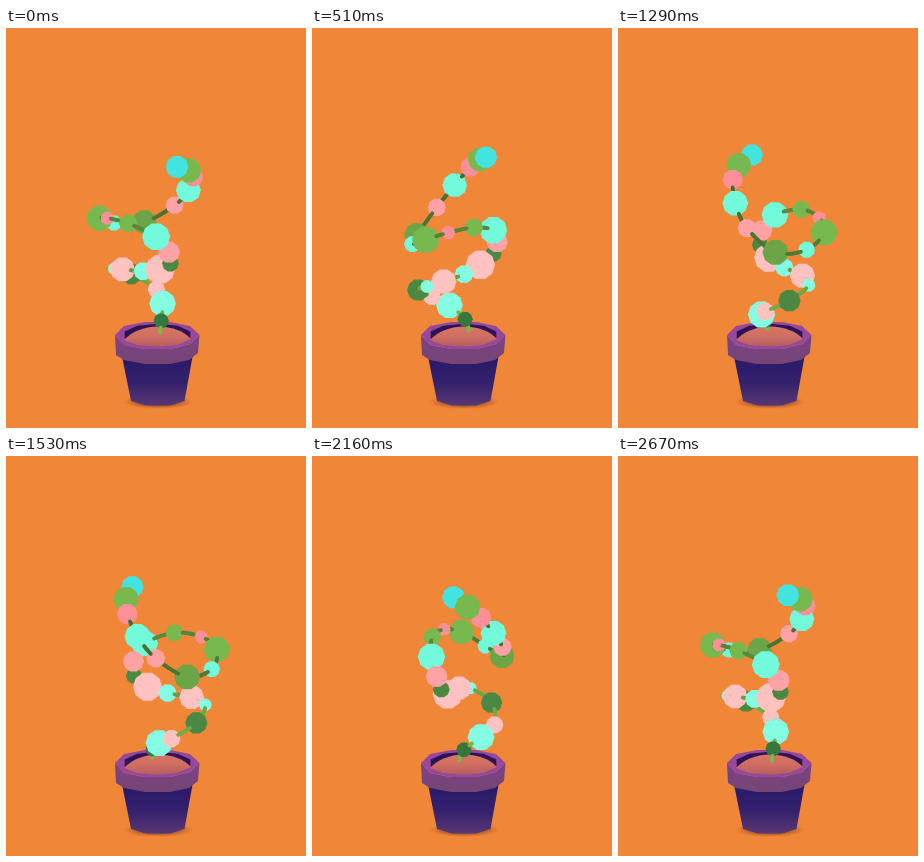
Recreate the animation shown at these times as an HTML page with a canvas. Size 300x400 px, loop 2700 ms.

```html
<!DOCTYPE html>
<html lang="en">
<head>
<meta charset="utf-8">
<title>Potted plant</title>
<style>
html, body { margin: 0; width: 100%; height: 100%; overflow: hidden; background: #f08637; }
canvas { display: block; }
</style>
</head>
<body>
<canvas id="stage" width="300" height="400"></canvas>
<script>
const ctx = document.getElementById("stage").getContext("2d");
const LOOP = 2700, STEP = 30;
const CENTER = 151.2, TILT = 0.333, RISE = 0.943;

const COLORS = {
  deep: "#34783d", dark: "#4b8841", green: "#78b94f", mid: "#6ba547",
  cyan: "#72fadb", ice: "#85fde3", aqua: "#43e4df",
  pink: "#fd9096", rose: "#ffa2a6", blush: "#ffc2c0"
};

// Each blob: sideways offset, depth offset, height on stage, radius, color.
const blobs = [
  [4, -0.5, 292.5, 7.5, "deep"],
  [5.4, 17, 281.2, 13.2, "ice"],
  [-0.8, 33.3, 272.5, 8.7, "blush"],
  [-25.8, 38.2, 258.8, 10.7, "dark"],
  [-43, 21.7, 248, 6.3, "ice"],
  [-34.6, 7, 243.7, 12.2, "blush"],
  [-14.3, -6.6, 241, 9, "ice"],
  [2.9, -17.3, 235.6, 14.5, "blush"],
  [13.2, -27.3, 226.4, 8, "dark"],
  [11.8, -31.8, 213.5, 10.5, "rose"],
  [-1.1, -33, 197.7, 13.4, "cyan"],
  [-29.1, -23.1, 187.7, 8.8, "green"],
  [-49.9, -3.9, 188.8, 6.6, "pink"],
  [-57.7, 17.1, 196, 13, "green"],
  [-43.1, 37.4, 207.5, 8, "cyan"],
  [-12.7, 45, 208.9, 12.4, "mid"],
  [17.4, 35.6, 189.2, 9, "rose"],
  [31.2, 21.7, 169.5, 12.4, "cyan"],
  [35.8, 6.9, 151, 10, "pink"],
  [31.5, -5.6, 140.5, 12.4, "green"],
  [19.8, -16.6, 133.3, 11, "aqua"]
].map(([x, z, y, r, color]) => ({ x, z, y, r, color: COLORS[color] }));

const root = { x: 3, z: -5, y: 303 };
const stem = buildStem([root, ...blobs], 14);

function spline(a, b, c, d, t) {
  return b + 0.5 * t * (c - a + t * (2 * a - 5 * b + 4 * c - d + t * (3 * (b - c) + d - a)));
}

function insideBlob(p) {
  return blobs.some(b => Math.hypot(p.x - b.x, p.z - b.z, (p.y - b.y) / RISE) < b.r * 0.96);
}

function buildStem(nodes, parts) {
  const points = [];
  const at = i => nodes[Math.max(0, Math.min(nodes.length - 1, i))];
  for (let i = 0; i < nodes.length - 1; i++) {
    for (let k = 0; k < parts; k++) {
      const mix = key => spline(at(i - 1)[key], at(i)[key], at(i + 1)[key], at(i + 2)[key], k / parts);
      const p = { x: mix("x"), y: mix("y"), z: mix("z") };
      p.hidden = insideBlob(p);
      points.push(p);
    }
  }
  return points;
}

function project(p, angle) {
  const c = Math.cos(angle), s = Math.sin(angle);
  const depth = p.x * s + p.z * c;
  return {
    x: CENTER + p.x * c - p.z * s,
    y: p.y - TILT * depth,
    depth: RISE * depth + TILT / RISE * p.y,
    scale: 1 - depth / 1400
  };
}

function polygon(points, fill) {
  ctx.beginPath();
  points.forEach(([x, y]) => ctx.lineTo(x, y));
  ctx.closePath();
  ctx.fillStyle = fill;
  ctx.fill();
}

function ring(cx, cy, rx, ry, sides, turn = 0) {
  return Array.from({ length: sides }, (_, i) => {
    const a = turn + i * 2 * Math.PI / sides;
    return [cx + rx * Math.cos(a), cy + ry * Math.sin(a)];
  });
}

function vertical(y0, y1, ...stops) {
  const g = ctx.createLinearGradient(0, y0, 0, y1);
  stops.forEach((c, i) => g.addColorStop(i / (stops.length - 1), c));
  return g;
}

function drawShadow() {
  ctx.save();
  ctx.translate(152, 374);
  ctx.scale(1, 0.2);
  const g = ctx.createRadialGradient(0, 0, 18, 0, 0, 36);
  g.addColorStop(0, "rgba(120,60,40,.7)");
  g.addColorStop(1, "rgba(190,95,40,0)");
  ctx.fillStyle = g;
  ctx.fillRect(-40, -40, 80, 80);
  ctx.restore();
}

function drawPot() {
  drawShadow();
  polygon([[115.5, 326], [187, 326], [178.5, 373], [164, 377.5], [140, 377.5], [125, 373]],
    vertical(332, 378, "#2a1a6b", "#35216d", "#5a3873"));

  const front = [[109, 307], [118, 317], [139, 321], [164, 321], [184, 316], [193.5, 307]];
  const lower = [[192, 325], [183, 332], [164, 336], [139, 336], [118, 332], [110, 327]];
  polygon([...front, ...lower], vertical(308, 336, "#7b4286", "#764574"));
  polygon([...front, [184, 298], [164, 294], [139, 294], [118, 298]], "#98489c");
  polygon(ring(151.5, 307, 34.5, 11.3, 10, Math.PI / 10), "#2c1457");

  ctx.beginPath();
  ctx.moveTo(118, 312);
  ctx.quadraticCurveTo(130, 299, 152, 298.5);
  ctx.quadraticCurveTo(174, 299, 185, 311);
  ctx.lineTo(171, 317);
  ctx.lineTo(152, 318.8);
  ctx.lineTo(131, 317);
  ctx.closePath();
  ctx.fillStyle = vertical(298, 319, "#d97561", "#cf6e62", "#b35d5f");
  ctx.fill();
}

function stemColor(t) {
  const mix = (a, b) => Math.round(a + (b - a) * t);
  return `rgb(${mix(126, 62)},${mix(184, 98)},${mix(75, 46)})`;
}

function drawPlant(angle) {
  const items = [];
  const path = stem.map(p => project(p, angle));
  for (let i = 1; i < path.length; i++) {
    if (stem[i - 1].hidden && stem[i].hidden) continue;
    const a = path[i - 1], b = path[i];
    items.push({
      depth: (a.depth + b.depth) / 2,
      draw() {
        ctx.beginPath();
        ctx.moveTo(a.x, a.y);
        ctx.lineTo(b.x, b.y);
        ctx.strokeStyle = stemColor(i / path.length);
        ctx.lineWidth = 3.8;
        ctx.lineCap = "round";
        ctx.stroke();
      }
    });
  }
  for (const blob of blobs) {
    const p = project(blob, angle), r = blob.r * p.scale * 1.02;
    items.push({
      depth: p.depth,
      draw: () => polygon(ring(p.x, p.y, r, r, 10), blob.color)
    });
  }
  items.sort((a, b) => b.depth - a.depth).forEach(item => item.draw());
}

function render(now) {
  const time = Math.floor((now % LOOP) / STEP) * STEP;
  ctx.fillStyle = "#f08637";
  ctx.fillRect(0, 0, 300, 400);
  drawPot();
  drawPlant(time / LOOP * 2 * Math.PI);
}

const start = performance.now();
function tick() {
  render(performance.now() - start);
  requestAnimationFrame(tick);
}
tick();
</script>
</body>
</html>
```
